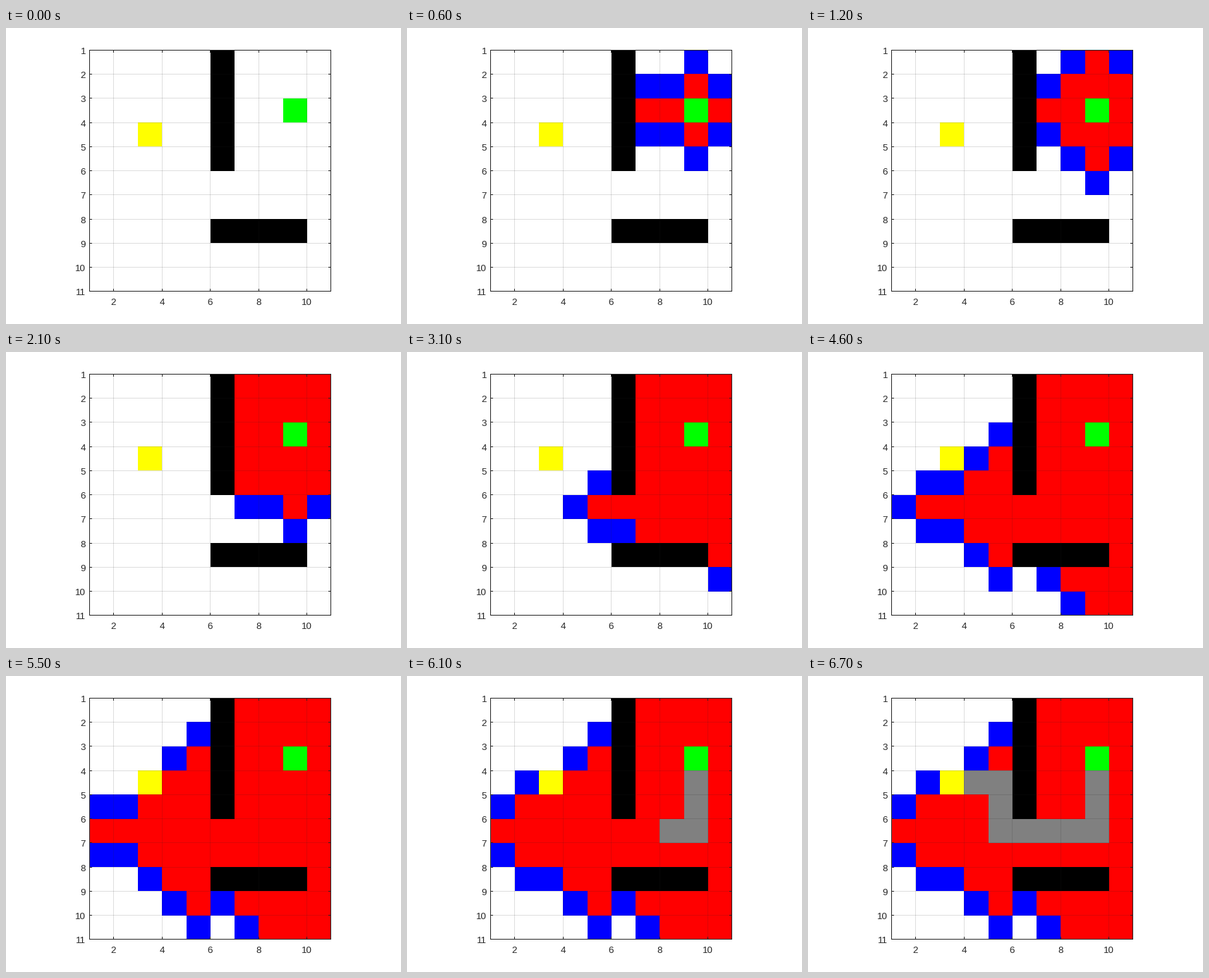
Write a matplotlib script that moves like this. It is 560 px wide and 420 px high and loops after 6800 ms.

```python
import numpy as np
import matplotlib.pyplot as plt
from matplotlib.animation import FuncAnimation
from matplotlib.colors import ListedColormap
from matplotlib.patches import Rectangle

W, H, DPI = 560, 420, 100
N = 10
INK = "#262626"
FREE, WALL, DONE, SEEN, START, GOAL, PATH = range(7)
COLORS = ["#ffffff", "#000000", "#ff0000", "#0000ff",
          "#00ff00", "#ffff00", "#808080"]


def make_world():
    world = np.full((N, N), FREE)
    world[0:5, 5] = WALL
    world[7, 5:9] = WALL
    return world


def dijkstra(world, start, goal):
    """Return the map after every expansion, then after every path cell."""
    world = world.copy()
    world[start], world[goal] = START, GOAL
    states = [world.copy()]
    dist, parent, closed = {start: 0}, {}, set()

    while True:
        # equal distances are taken column by column
        cell = min((c for c in dist if c not in closed),
                   key=lambda c: (dist[c], c[1], c[0]))
        if cell == goal:
            break
        closed.add(cell)
        if cell != start:
            world[cell] = DONE
        r, c = cell
        for near in ((r - 1, c), (r + 1, c), (r, c - 1), (r, c + 1)):
            inside = 0 <= near[0] < N and 0 <= near[1] < N
            if not inside or near in closed or world[near] == WALL:
                continue
            if dist[cell] + 1 <= dist.get(near, np.inf):
                dist[near] = dist[cell] + 1
                parent[near] = cell
                if near != goal:
                    world[near] = SEEN
        states.append(world.copy())

    route = []
    cell = parent[goal]
    while cell != start:
        route.append(cell)
        cell = parent[cell]
    for cell in reversed(route):
        world[cell] = PATH
        states.append(world.copy())
    return states


states = dijkstra(make_world(), start=(2, 8), goal=(3, 2))

plt.rcParams["font.family"] = "Liberation Sans"
fig = plt.figure(figsize=(W / DPI, H / DPI), dpi=DPI, facecolor="white")
ax = fig.add_axes([0, 0, 1, 1])
ax.set_xlim(0, W)
ax.set_ylim(H, 0)
ax.axis("off")

# cell edges and line positions in whole pixels
k = np.arange(N + 1)
x_edges = np.round(118.7 + 34.23 * k)
y_edges = np.round(31.2 + 34.28 * k)
x_lines = np.floor(118.7 + 34.23 * k)
y_lines = np.floor(31.5 + 34.23 * k)
left, right = x_lines[0], x_lines[-1]
top, bottom = y_lines[0], y_lines[-1]

mesh = ax.pcolormesh(x_edges, y_edges, states[0], cmap=ListedColormap(COLORS),
                     vmin=-0.5, vmax=len(COLORS) - 0.5, zorder=1)


def bar(x, y, w, h, alpha=1.0, zorder=3):
    ax.add_patch(Rectangle((x, y), w, h, fc=INK, lw=0,
                           alpha=alpha, zorder=zorder))


def label(x, y, text, ha):
    ax.text(x, y, text, ha=ha, va="baseline", color=INK, fontsize=9.6)


TICK = 3
for i, x in enumerate(x_lines, 1):
    if i % 2 == 0:
        bar(x, top + 1, 1, bottom - top - 1, alpha=0.15, zorder=2)
        bar(x, top, 1, TICK + 1)
        bar(x, bottom - TICK, 1, TICK + 1)
        label(x + 0.5, 393, str(i), "center")

for i, y in enumerate(y_lines, 1):
    if 1 < i < N + 1:
        bar(left + 1, y, right - left - 1, 1, alpha=0.15, zorder=2)
        bar(left, y, TICK + 1, 1)
        bar(right - TICK, y, TICK + 1, 1)
    label(113, y + 6, str(i), "right")

for y in (top, bottom):
    bar(left, y, right - left + 1, 1)
for x in (left, right):
    bar(x, top, 1, bottom - top + 1)


def update(i):
    mesh.set_array(states[i])
    return (mesh,)


anim = FuncAnimation(fig, update, frames=len(states), interval=100,
                     repeat=True, repeat_delay=0, blit=False)
plt.show()
```
